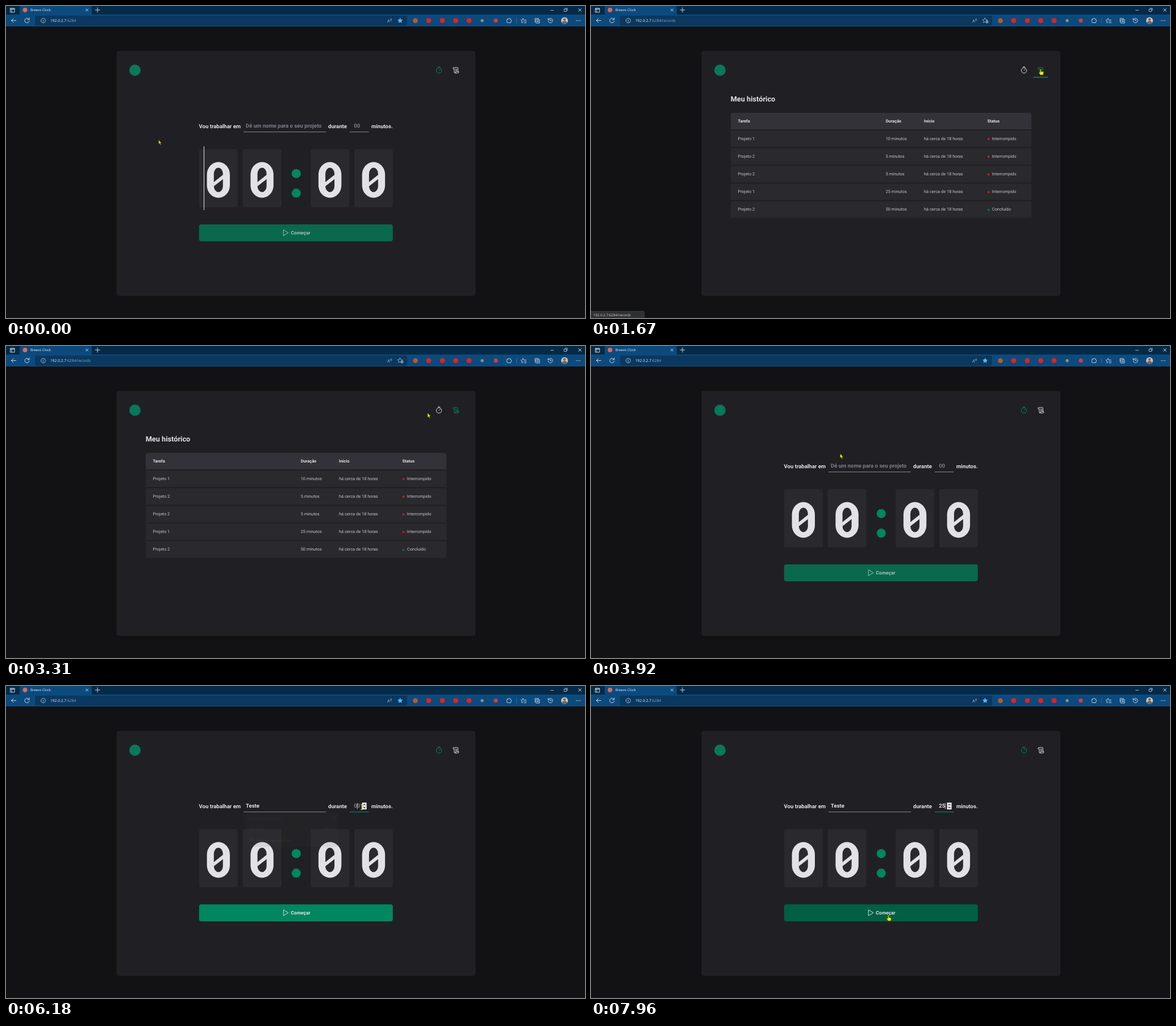
An HTML page that plays this animation: 1019 px wide and 549 px high, repeating every 7.99 s.

```html
<!DOCTYPE html>
<html lang="pt">
<head>
<meta charset="utf-8">
<title>Timer</title>
<style>
  html, body { margin: 0; width: 100%; height: 100%; overflow: hidden; background: #121214; }
  svg { display: block; width: 100%; height: 100%; }
  text { font-family: Roboto, sans-serif; white-space: pre; text-rendering: geometricPrecision; }
  .ui { font-family: "Open Sans", "Noto Sans", sans-serif; }
  .b { font-weight: 700; }
  .line { fill: none; stroke: currentColor; stroke-linecap: round; stroke-linejoin: round; }
</style>
</head>
<body>
<svg id="stage" viewBox="0 0 1019 549"></svg>
<script>
const LOOP = 7990, GREEN = '#00875f', LIGHT = '#e1e1e6', GREY = '#7c7c8a';
const HOST = '192.0.2.7', PORT = ':6284', PATH = '/records';

// Shape helpers that return SVG markup
const rect = (x, y, w, h, fill, r = 0, extra = '') =>
  `<rect x="${x}" y="${y}" width="${w}" height="${h}" rx="${r}" fill="${fill}" ${extra}/>`;
const disc = (x, y, r, fill) => `<circle cx="${x}" cy="${y}" r="${r}" fill="${fill}"/>`;
const line = (d, color = '#dbe6f0', w = 0.9) =>
  `<path class="line" d="${d}" style="color:${color}" stroke-width="${w}"/>`;
const text = (x, y, s, size, fill, cls = '', extra = '') =>
  `<text x="${x}" y="${y}" font-size="${size}" fill="${fill}" class="${cls}" ${extra}>${s}</text>`;
const group = (id, body, extra = '') => `<g id="${id}" ${extra}>${body}</g>`;
const ring = (x, y, r) => `M${x - r} ${y}a${r} ${r} 0 1 0 ${2 * r} 0a${r} ${r} 0 1 0 ${-2 * r} 0`;
const cross = (x, y, r) => `M${x - r} ${y - r}l${2 * r} ${2 * r}m0 ${-2 * r}l${-2 * r} ${2 * r}`;

function star(x, y, r) {
  const pts = Array.from({ length: 10 }, (_, i) => {
    const a = i * Math.PI / 5, q = i % 2 ? r * 0.48 : r;
    return `${x + q * Math.sin(a)} ${y - q * Math.cos(a)}`;
  });
  return `M${pts.join('L')}Z`;
}

function browser() {
  const bar = '#0c4a7e';
  return rect(0, 0, 1019, 16, '#052a47') + rect(0, 15, 1019, 21, bar) +
    `<path d="M22 16q2 0 2-3V3q0-3 3-3h121q3 0 3 3v10q0 3 2 3z" fill="${bar}"/>` +
    rect(51, 17, 655, 17.5, '#0a3860', 3) +
    // tab strip
    line('M8 4h7v7h-7zM8 5.5h7M10 5.5v5') + disc(33.5, 7, 4, '#e0685a') +
    text(43, 9.3, 'Breevo Clock', 6, '#f4f7fa', 'ui') +
    line(cross(142.5, 7, 2)) + line('M157 7h8M161 3v8') +
    line('M958.5 7.5h5M982.5 5.5h4v4h-4zM984 4h4v4', undefined, 0.7) + line(cross(1010, 7, 2.4)) +
    // navigation
    line('M17.5 25.5h-8m3.5-3.5l-3.5 3.5l3.5 3.5') +
    line('M40.5 23.5a4 4 0 1 0 .5 3M41 21v3h-3') +
    line(ring(65.5, 25.7, 4) + 'M65.5 25.3v2.3M65.5 23.6v.1', '#c7d5e2', 0.8) +
    text(78, 28.2, HOST, 6.65, '#f4f7fa', 'ui') +
    text(106.3, 28.2, PORT, 6.65, '#91a9be', 'ui', 'id="port"') +
    text(671, 28.8, 'A', 7.5, '#a9bccd', 'ui') + line('M676.5 23q1 1 0 2.5M678 22q1.5 1.8 0 4', '#a9bccd', 0.7) +
    group('starOn', `<path d="${star(693.6, 25.8, 5)}" fill="#5eb2f4"/>`) +
    group('starOff', line(star(693.4, 25.6, 4.6), '#a9bccd', 0.8) + disc(697, 28, 2.4, '#a9bccd') +
      line('M695.8 28h2.4M697 26.8v2.4', '#0a3860', 0.6)) +
    // extensions
    disc(720.5, 25.7, 4.3, '#b9582c') + [744, 768, 791.5, 815].map(x => disc(x, 25.7, 4.4, '#e2211f')).join('') +
    disc(838, 25.7, 2.7, '#8d8b83') + disc(862, 25.7, 3.6, '#d93a3c') +
    line('M882.6 23h1.8a1.3 1.3 0 0 1 2.6 0h1.4v1.8a1.3 1.3 0 0 1 0 2.6v2h-5.8q-1 0-1-1v-4.4q0-1 1-1z', undefined, 0.8) +
    line('M898.5 22v8', '#4b7aa3', 0.7) +
    line('M910 22l1.2 2.5h4M910 22l-1.2 2.5l-2.5.4l1.8 2l-.5 2.8l2.4-1.3M912 27h3.5M912 29.5h3.5', undefined, 0.8) +
    line('M931 28v-6h6v1.5M933 24h6v6h-6zM936 25.5v3M934.5 27h3', undefined, 0.8) +
    line('M954.5 24a4 4 0 1 1-.3 2.5M954 21.5v2.8h2.8M958.2 23.5v2.4h2', undefined, 0.8) +
    disc(983, 25.7, 6, '#c9c4bd') + disc(983, 23.8, 2.3, '#74655b') +
    '<path d="M978.6 29.8q0-3.3 4.4-3.3t4.4 3.3q-4.4 4-8.8 0z" fill="#74655b"/>' +
    [1004, 1007, 1010].map(x => disc(x, 25.7, 0.75, LIGHT)).join('');
}

const watchIcon = line(ring(762, 113.4, 4.7) + 'M762 113.4l2.3-2.3M760.2 107.2h3.6', 'inherit', 0.95);
const scrollIcon = line('M787.2 111q-1.4-2.8 1-2.8h6.2q1 0 1 1.2v5.6M788.9 110.2v6q0 1.7 1.5 1.7h5.3' +
  'q1.5 0 1.1-2.6h-5.7q.5 2.6-1 2.6M791 111.2h2.8M791 113.3h2.8', 'inherit', 0.95);

const zero = x => rect(x, 252, 68, 102.3, '#29292e', 4) +
  `<rect x="${x + 13.8}" y="274.5" width="40.4" height="63" rx="20.2" ry="22" fill="${LIGHT}"/>` +
  `<rect x="${x + 26}" y="284.6" width="16" height="42.8" rx="8" ry="10.5" fill="#29292e"/>` +
  `<path d="M${x + 25.5} 310.2l17-13.4v7.4l-17 13.4z" fill="${LIGHT}"/>`;

function timerPage() {
  return text(339.5, 215, 'Vou trabalhar em', 9.55, LIGHT, 'b') +
    text(567, 215, 'durante', 9.55, LIGHT, 'b') + text(643, 215, 'minutos.', 9.55, LIGHT, 'b') +
    text(422, 214.3, '', 9.55, GREY, 'b', 'id="task"') +
    text(617.8, 214.3, '', 9.55, GREY, 'b', 'id="mins" text-anchor="middle"') +
    rect(418, 221, 145, 1.1, GREY, 0, 'id="taskLine"') + rect(605, 221, 33.5, 1.1, GREY, 0, 'id="minsLine"') +
    group('spinner', rect(626.6, 205.2, 8, 12, '#f2f2f2') +
      line('M629 209.6l1.6-1.6l1.6 1.6M629 213l1.6 1.6l1.6-1.6', '#333', 1.1)) +
    [339.8, 416.6, 536.1, 612.9].map(zero).join('') +
    disc(510.8, 294.9, 8, GREEN) + disc(510.8, 329.3, 8, GREEN) +
    rect(348, 247, 1, 112, LIGHT, 0, 'id="bigCaret"') +
    rect(339.8, 384.3, 341, 29.7, GREEN, 4, 'id="button"') +
    group('label', line('M488.3 394.2v10l8.2-5z', LIGHT, 0.95) + text(501.3, 402.1, 'Começar', 8.5, LIGHT, 'b')) +
    rect(0, 206, 0.8, 10.5, LIGHT, 0, 'id="caret"');
}

function historyPage() {
  const cols = [258.5, 518.7, 586, 697.5];
  const tasks = [['1', 10], ['2', 5], ['2', 5], ['1', 25], ['2', 50]];
  const head = ['Tarefa', 'Duração', 'Início', 'Status'].map((s, i) => text(cols[i], 204.7, s, 7.43, LIGHT, 'b'));
  const rows = tasks.map(([n, min], i) => {
    const y = 219 + 31.2 * i, base = y + 16.6, done = i === 4;
    const cells = ['Projeto ' + n, min + ' minutos', 'há cerca de 18 horas'];
    return rect(246, y, 529, 29, '#29292e') +
      cells.map((s, c) => text(cols[c], base, s, 7.43, '#c4c4cc')).join('') +
      disc(699.5, y + 15, 2.1, done ? '#04704f' : '#ab222e') +
      text(705.8, base, done ? 'Concluído' : 'Interrompido', 7.43, '#c4c4cc');
  });
  return text(245.7, 168, 'Meu histórico', 12.74, LIGHT, 'b') +
    '<path d="M246 217v-25q0-4 4-4h521q4 0 4 4v25z" fill="#323238"/>' + head.join('') + rows.join('');
}

function dropdowns() {
  const box = h => rect(417.8, 222, 170.2, h, '#4a4a4a', 1);
  const head = s => text(425, 234, s, 5.6, '#c6c6c6', 'ui') + line(cross(580, 232, 2.1), '#eee', 0.8);
  const item = (x, y, s) => text(x, y + 2.2, s, 6.2, '#fff', 'ui');
  const list = [['Projeto 1', 251], ['Projeto 2', 271], ['Projeto 3', 291.5],
    ['A', 316], ['AAA', 334], ['AA', 352], ['a', 370.5]];
  return group('fullList', box(159) + head("Type '/' to search from your saved info") +
      list.map(([s, y]) => item(424.3, y, s)).join('') + rect(418, 303.6, 170, 0.7, '#6d6d6d')) +
    group('shortList', box(62) + head('Results from saved info') + item(425, 251, 'Testando') +
      item(564, 251, 'Frame') + line(ring(429, 270, 1.6) + 'M426 275q0-3 3-3t3 3', '#fff', 0.7) +
      item(439, 272, 'Manage personal info'));
}

const POINTER = 'stroke="#1c1c10" stroke-width=".6" fill="#e6f000"';
document.getElementById('stage').innerHTML =
  rect(0, 0, 1019, 549, '#121214') + browser() + rect(0, 548.2, 1019, 0.8, '#2a1517') +
  rect(194.5, 79, 631.5, 431, '#202024', 4) + disc(227, 113, 10, '#08785a') +
  group('watch', watchIcon) + group('scroll', scrollIcon) +
  rect(0, 124.6, 25.5, 1.6, GREEN, 0, 'id="navLine"') +
  group('timerPage', timerPage()) + group('historyPage', historyPage()) + dropdowns() +
  group('tip', rect(794, 125, 38.5, 12, '#2b2b2b', 1, 'stroke="#555" stroke-width=".5"') +
    text(798, 133.2, 'Histórico', 6.2, '#fff', 'ui')) +
  group('status', rect(-2, 537, 96, 14, '#2f3033', 2, 'stroke="#4a4a4a" stroke-width=".5"') +
    text(4, 545.5, '', 6.2, '#d6d6d6', 'ui', 'id="statusText"')) +
  group('mouse',
    `<path id="arrow" d="M.4.3v8l1.8-1.5l1.3 2.8l1.5-.7l-1.3-2.7h2.4z" ${POINTER}/>` +
    group('beam', line('M-1.5-4.5h3M0-4.5v9M-1.5 4.5h3', '#d8d860', 0.9)) +
    `<path id="hand" d="M-.8.4q1-1.1 2 0v3.6l3.6.8q1 .3.8 1.5l-.8 4.1h-5.1l-2.8-4.3q.7-1.4 2.3 0z" ${POINTER}/>`);

const $ = id => document.getElementById(id);
const show = (id, on) => $(id).setAttribute('visibility', on ? 'visible' : 'hidden');
const paint = (id, color) => $(id).setAttribute('fill', color);
const between = (t, a, b) => t >= a && t < b;

const OPEN_HISTORY = 1520, OPEN_TIMER = 3600, FOCUS_TASK = 4430, FOCUS_MINS = 6080;
const TYPE_TASK = 5220, KEY = 80, TYPE_TWO = 6600, TYPE_FIVE = 6780, BLINK = 530;

// Pointer route: time, x, y
const ROUTE = [
  [30, 268, 235], [800, 815, 144], [830, 815, 142], [1060, 791, 111], [1910, 791, 111],
  [2430, 293, 229], [2560, 276, 272], [2700, 300, 255], [3400, 762, 111], [3620, 762, 111],
  [3920, 438, 189], [4280, 459, 211], [4840, 459, 212], [5050, 459, 238], [5660, 459, 238],
  [6040, 626, 213], [6900, 626, 213], [7250, 608, 288], [7290, 606, 289], [7800, 523, 403]
];
function pointerAt(t) {
  const i = ROUTE.findIndex(k => k[0] > t);
  if (i < 1) return ROUTE.at(i).slice(1);
  const [t0, x0, y0] = ROUTE[i - 1], [t1, x1, y1] = ROUTE[i];
  const p = (t - t0) / (t1 - t0), e = p * p * (3 - 2 * p);
  return [x0 + (x1 - x0) * e, y0 + (y1 - y0) * e];
}

function drawForm(t) {
  const typed = Math.max(0, Math.min(5, Math.floor((t - TYPE_TASK) / KEY) + 1));
  const mins = t < TYPE_TWO ? '' : t < TYPE_FIVE ? '2' : '25';
  $('task').textContent = 'Teste'.slice(0, typed) || 'Dê um nome para o seu projeto';
  paint('task', typed ? LIGHT : GREY);
  $('mins').textContent = mins || '00';
  paint('mins', mins ? LIGHT : GREY);
  paint('taskLine', between(t, FOCUS_TASK, FOCUS_MINS) ? GREEN : GREY);
  paint('minsLine', t >= FOCUS_MINS ? GREEN : GREY);

  const onMins = t >= FOCUS_MINS;
  const lastKey = onMins
    ? (mins === '25' ? TYPE_FIVE : mins ? TYPE_TWO : FOCUS_MINS)
    : (typed ? TYPE_TASK + KEY * (typed - 1) : FOCUS_TASK);
  const width = id => $(id).getComputedTextLength();
  const x = onMins ? 617.8 + (mins ? width('mins') / 2 : 0) : 422 + (typed ? width('task') : 0);
  $('caret').setAttribute('x', x);
  show('caret', t >= FOCUS_TASK && Math.floor((t - lastKey) / BLINK) % 2 === 0);

  show('fullList', between(t, FOCUS_TASK, TYPE_TASK));
  const fade = Math.max(0, Math.min(1, (t - 6070) / 120)), s = 1 - 0.035 * fade;
  show('shortList', t >= TYPE_TASK && fade < 1);
  $('shortList').setAttribute('opacity', 1 - fade);
  $('shortList').setAttribute('transform', `translate(503 253) scale(${s}) translate(-503 -253)`);
  return typed > 0;
}

function draw(now) {
  const t = now % LOOP, [x, y] = pointerAt(t);
  const inside = (x0, y0, x1, y1) => x >= x0 && x <= x1 && y >= y0 && y <= y1;
  const history = between(t, OPEN_HISTORY, OPEN_TIMER);
  const onScroll = inside(778.5, 100, 804, 126), onWatch = inside(749, 100, 774.5, 126);

  // Hidden pages must not leave visible children behind
  $('timerPage').style.display = history ? 'none' : '';
  $('historyPage').style.display = history ? '' : 'none';
  show('starOn', !history);
  show('starOff', history);
  $('port').textContent = PORT + (history ? PATH : '');
  $('watch').style.color = history ? LIGHT : GREEN;
  $('scroll').style.color = history ? GREEN : LIGHT;

  show('navLine', onScroll || onWatch);
  $('navLine').setAttribute('x', onScroll ? 778.5 : 749.2);
  show('tip', between(t, 1430, OPEN_HISTORY));
  const linked = (onScroll && t < 1700) || (onWatch && t < 3750);
  $('status').style.display = linked ? '' : 'none';
  $('statusText').textContent = HOST + PORT + (onScroll ? PATH : '');

  show('bigCaret', t < 400 || between(t, 930, 1460));
  const ready = drawForm(t), onButton = inside(339.5, 384, 681, 414);
  paint('button', !ready ? '#0a684d' : onButton ? '#015f43' : GREEN);
  $('label').setAttribute('opacity', ready ? 1 : 0.72);

  const onMinutes = inside(605, 202, 638.5, 222);
  const onInput = !history && (onMinutes || inside(418, 202, 563, 222));
  show('spinner', t >= FOCUS_MINS || (onMinutes && !history));
  const kind = onScroll || onWatch || (onButton && ready) ? 'hand' : onInput ? 'beam' : 'arrow';
  for (const id of ['arrow', 'beam', 'hand']) $(id).style.display = id === kind ? '' : 'none';
  paint('arrow', t < 30 ? '#d9b56c' : '#e6f000');
  $('mouse').setAttribute('transform', `translate(${x} ${y})`);
}

function tick() {
  draw(performance.now());
  requestAnimationFrame(tick);
}
tick();
</script>
</body>
</html>
```
